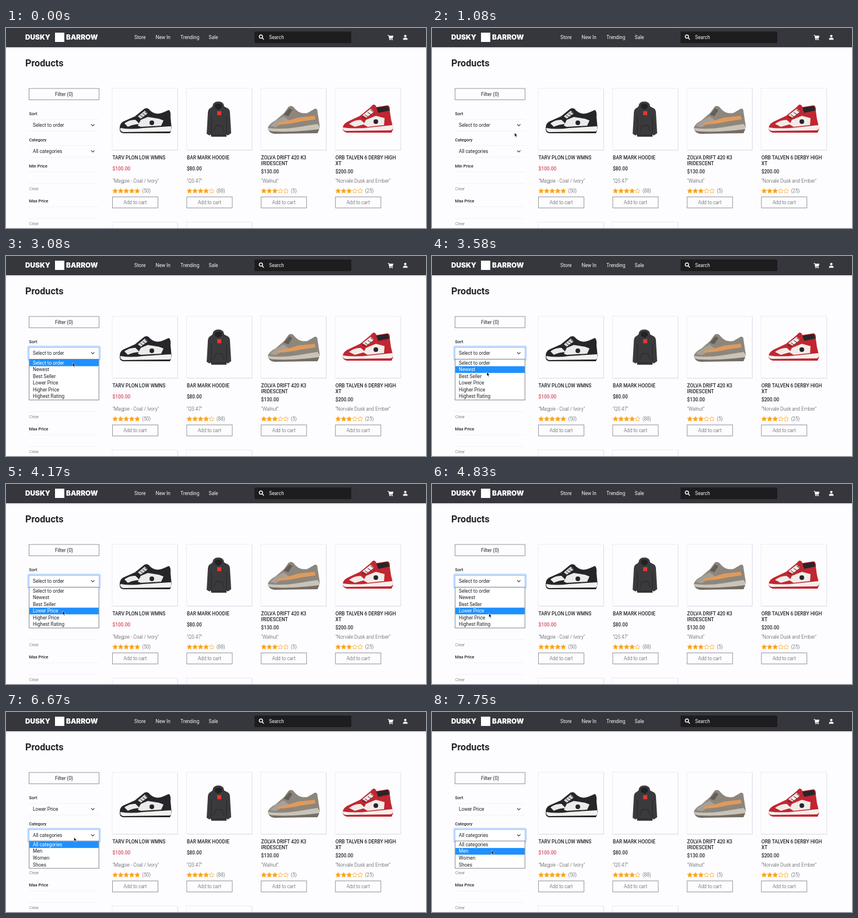
These frames come from a looping animation (720 px wide and 344 px high, 8 s). An HTML page:

```html
<!DOCTYPE html>
<html lang="en">
<head>
<meta charset="utf-8">
<title>Shop filters</title>
<style>
  html, body { margin: 0; width: 100%; height: 100%; overflow: hidden; background: #fdfdff; }
  svg { display: block; width: 720px; height: 344px; }
  text { font: 400 8.3px Roboto, sans-serif; fill: #212429; }
  .brand { font: 900 11.8px Inter, sans-serif; fill: #fff; }
  .nav { fill: #f6f6f8; }
  .h1 { font-size: 16.2px; font-weight: 600; }
  .label { font-size: 7.4px; font-weight: 500; }
  .clear { font-size: 7.3px; font-weight: 300; fill: #505258; }
  .bold { font-weight: 500; }
  .sale { fill: #d9485a; }
  .light { font-weight: 300; fill: #45474d; }
  .mid { text-anchor: middle; }
  .rule { stroke: #d4d4e6; stroke-width: .8; stroke-dasharray: 1 2; }
  .chev { fill: none; stroke: #34363c; stroke-width: 1.1; stroke-linecap: round; stroke-linejoin: round; }
  .btn { fill: none; stroke: #8c8d93; stroke-width: .9; }
  .star { fill: #fba31c; stroke: #fba31c; stroke-width: .7; stroke-linejoin: round; }
  .star.off { fill: none; }
  .list { fill: #fff; stroke: #77787f; stroke-width: .9; }
  .hit { fill: #1e90ff; }
</style>
</head>
<body>
<svg viewBox="0 0 720 344" xmlns="http://www.w3.org/2000/svg">
  <defs>
    <linearGradient id="drop" x2="0" y2="1">
      <stop stop-color="#9a9aa4" stop-opacity=".7"/>
      <stop offset="1" stop-color="#fff" stop-opacity="0"/>
    </linearGradient>

    <g id="low">
      <path fill="#25262a" d="M195 171Q195 163 203 160L221 152 237 139Q243 136 247 142 257 151 270 145L279 141Q283 143 282 153L284 174 281 181 201 181Q195 180 195 175Z"/>
      <path fill="#ebebe9" d="M203 164Q212 157 222 158L229 165Q216 166 209 170Z"/>
      <path fill="#ebebe9" d="M231 158L243 153 262 156 270 159 266 168 231 170 226 168Z"/>
      <path fill="#d6d6d6" d="M226 152L238 142 243 147 231 156Z"/>
      <path fill="#f1f1ee" d="M196 172Q214 175 235 172L283 169 284 175 281 178 201 179Q195 178 196 172Z"/>
      <circle cx="250" cy="163" r="4" fill="#25262a"/>
      <path fill="none" stroke="#25262a" d="M226 153l6 4M230 150l6 4M234 147l6 4M238 144l6 4"/>
    </g>

    <g id="hoodie">
      <path fill="#3a3a3d" d="M355 131Q358 126 364 126.500 370 126 373 131L374 135 380 138Q384 140 384 147L386 181 380 185 378 183 378 187 352 187 351 183 349 185 344 182 346 147Q346 140 350 138L354 135Z"/>
      <path fill="#232326" d="M358 132Q364 128 370 132L370 137 364 141 358 137Z"/>
      <path fill="none" stroke="#232326" stroke-width=".8" d="M352 151L352 183M378 151L378 183M356 178L360 168 370 168 374 178M352 184L378 184"/>
      <rect x="362" y="143" width="7" height="7" fill="#e2382f"/>
    </g>

    <g id="knit">
      <path fill="#8d867d" d="M449 171Q452 164 462 159L477 146 484 136Q488 132 493 136 502 149 517 146L529 139Q534 138 534 144L538 170Q536 180 520 180L460 181Q449 180 449 171Z"/>
      <path fill="#a7a097" d="M452 168Q462 159 476 152L486 160Q472 164 462 171Z"/>
      <path fill="#df9a5b" d="M466 163Q484 160 501 154L529 151 531 157 505 161Q484 166 466 166Z"/>
      <path fill="#655f59" d="M476 149L486 138 491 141 484 152Z"/>
      <path fill="#c9c3ba" d="M449 172Q472 175 497 171L534 165 538 170Q537 177 526 178L461 179Q450 178 449 172Z"/>
      <path fill="#756e66" d="M451 177Q480 181 537 174L534 181 460 182Q453 181 451 177Z"/>
    </g>

    <g id="high">
      <g id="boot">
        <path fill="#c22631" d="M577 172Q578 164 588 160L607 151 624 137 629 132Q633 131 635 136L654 133Q659 134 658 143L660 157 664 173 661 180 584 180Q577 178 577 172Z"/>
        <path fill="#f1ece8" d="M588 165Q597 158 608 158L616 165 598 170Z"/>
        <path fill="#f1ece8" d="M617 158L634 151 649 155 648 167 620 170 613 166Z"/>
        <path fill="#f1ece8" d="M611 150L625 139 631 144 618 154Z"/>
        <path fill="#27262a" d="M635 137L655 134 657 142 638 146Z"/>
        <path fill="#f4f0ee" d="M577 171Q598 174 624 171L663 167 664 173 660 176 584 177Q577 177 577 171Z"/>
        <circle cx="634" cy="161" r="4" fill="#27262a"/>
        <path fill="none" stroke="#27262a" d="M610 152l6 4M615 149l6 4M620 145l6 4M625 141l6 4"/>
      </g>
    </g>
  </defs>

  <rect width="720" height="344" fill="#fdfdff"/>
  <rect y="32" width="720" height="5" fill="url(#drop)"/>
  <rect width="720" height="33" fill="#36373c"/>
  <text class="brand" x="33" y="20">DUSKY</text>
  <rect x="84" y="8" width="16" height="16" fill="#fff"/>
  <text class="brand" x="103" y="20">BARROW</text>
  <text class="nav" x="220" y="19">Store</text>
  <text class="nav" x="256.5" y="19">New In</text>
  <text class="nav" x="299" y="19">Trending</text>
  <text class="nav" x="347.5" y="19">Sale</text>
  <rect x="426" y="6" width="166" height="20" rx="1.5" fill="#1d1d20"/>
  <g fill="none" stroke="#fff" stroke-width="1.4" stroke-linecap="round">
    <circle cx="437" cy="14.8" r="2.8"/><path d="M439.2 17l2.4 2.4"/>
  </g>
  <text class="nav" x="451" y="19">Search</text>
  <g fill="#fff">
    <path d="M654.5 12h2l.4 1.2h7.2l-1.1 4.5h-5.2l.2.9h4.7v.9h-5.6l-1.4-6.4h-1.2z"/>
    <circle cx="658.3" cy="20" r="1"/><circle cx="662" cy="20" r="1"/>
    <circle cx="684.5" cy="13.800" r="2.1"/>
    <path d="M680.7 20.2v-1q0-2.5 2.6-2.5h2.4q2.6 0 2.6 2.5v1z"/>
  </g>

  <text class="h1" x="33" y="65.5">Products</text>
  <rect class="btn" x="39.5" y="104" width="120" height="19.5"/>
  <text class="mid" x="99.5" y="117">Filter (0)</text>
  <g id="side"></g>
  <g id="grid"></g>
  <g id="menus"></g>
  <path id="cursor" d="M0 0V7L1.6 5.6 2.8 8.2 4 7.6 2.9 5.1H5Z" fill="#111" stroke="#fff" stroke-width=".6"/>
</svg>

<script>
const $ = id => document.getElementById(id);
const text = (x, y, s, cls = '') => `<text class="${cls}" x="${x}" y="${y}">${s}</text>`;
const ROW = 11.55;

// Sidebar
const field = y => `<path class="rule" d="M39.5 ${y}h120M39.5 ${y + 20}h120"/>`;
const ring = (id, y) => `<g id="${id}Ring">
  <rect x="38" y="${y - 1.5}" width="123" height="23" rx="1.5" fill="#fff" stroke="#c3dbfd" stroke-width="3"/>
  <rect x="39.5" y="${y}" width="120" height="20" fill="none" stroke="#93bdf8" stroke-width=".8"/></g>`;
const select = (id, y, value) => field(y) + ring(id, y) +
  `<text id="${id}Value" x="46" y="${y + 12.8}">${value}</text>
  <path class="chev" d="M146.3 ${y + 8.6}l2.5 2.5 2.5-2.5"/>`;

$('side').innerHTML =
  text(39.5, 150, 'Sort', 'label') + select('sort', 157.3, 'Select to order') +
  text(39.5, 195, 'Category', 'label') + select('cat', 202.3, 'All categories') +
  text(39.5, 240, 'Min Price', 'label') + field(247.5) + text(39.8, 278.5, 'Clear', 'clear') +
  text(39.5, 300, 'Max Price', 'label') + field(307.5) + text(39.8, 338.5, 'Clear', 'clear');

// Product cards
const starPoints = (cx, cy) => Array.from({ length: 10 }, (_, i) => {
  const r = i % 2 ? 2.1 : 4.4, a = i * Math.PI / 5;
  return (cx + r * Math.sin(a)).toFixed(2) + ',' + (cy - r * Math.cos(a)).toFixed(2);
}).join(' ');

const card = (x, y) => `<rect x="${x + 1}" y="${y + 1}" width="112" height="106" fill="#dfdfee"/>
  <rect x="${x}" y="${y}" width="112" height="106" fill="#fdfdff" stroke="#e6e6f2" stroke-width=".8"/>`;

const products = [
  { art: 'low', title: ['TARV PLON LOW WMNS'], price: '$100.00', sale: true, note: 'Magpie - Coal / Ivory', stars: 5, votes: 50 },
  { art: 'hoodie', title: ['BAR MARK HOODIE'], price: '$80.00', note: 'QS 47', stars: 4, votes: 88 },
  { art: 'knit', title: ['ZOLVA DRIFT 420 K3', 'IRIDESCENT'], price: '$130.00', note: 'Walnut', stars: 3, votes: 5 },
  { art: 'high', title: ['ORB TALVEN 6 DERBY HIGH', 'XT'], price: '$200.00', note: 'Norvale Dusk and Ember', stars: 3, votes: 25 }
];

$('grid').innerHTML = products.map((p, i) => {
  const x = 182.5 + i * 127.4;
  const stars = Array.from({ length: 5 }, (_, k) =>
    `<polygon class="star ${k < p.stars ? '' : 'off'}" points="${starPoints(x + 4.6 + k * 9.5, 280.4)}"/>`);
  return card(x - .5, 103.8) + `<use href="#${p.art}"/>` +
    p.title.map((s, k) => text(x, 225.8 + k * 9.8, s, 'bold')).join('') +
    text(x, p.title.length > 1 ? 250 : 244.8, p.price, p.sale ? 'bold sale' : 'bold') +
    text(x, 266, `"${p.note}"`, 'light') + stars.join('') +
    text(x + 51, 283, `(${p.votes})`, 'light') +
    `<rect class="btn" x="${x}" y="290.5" width="78" height="19"/>` +
    text(x + 39, 303, 'Add to cart', 'light mid');
}).join('') + card(182, 333.5) + card(309.4, 333.5);

// Drop-down lists
const menu = (id, top, items) => {
  const g = document.createElementNS('http://www.w3.org/2000/svg', 'g');
  g.innerHTML = `<rect class="list" x="39.7" y="${top - .4}" width="119.6" height="${items.length * ROW + .8}"/>
    <rect class="hit" x="40.2" width="118.6" height="${ROW}"/>` +
    items.map((s, i) => text(46, top + 8.6 + i * ROW, s)).join('');
  $('menus').append(g);
  const hit = g.querySelector('.hit'), rows = g.querySelectorAll('text');
  return (open, y) => {
    const n = Math.max(0, Math.min(items.length - 1, Math.floor((y - top) / ROW)));
    g.style.display = open ? '' : 'none';
    hit.setAttribute('y', top + n * ROW);
    rows.forEach((r, i) => { r.style.fill = i === n ? '#fff' : ''; });
  };
};
const sortMenu = menu('sort', 178,
  ['Select to order', 'Newest', 'Best Seller', 'Lower Price', 'Higher Price', 'Highest Rating']);
const catMenu = menu('cat', 222.3, ['All categories', 'Men', 'Women', 'Shoes']);

// Pointer stops: time, x, y
const path = [
  [80, 656, 318], [500, 243, 83], [830, 243, 83], [1080, 141.5, 180], [1250, 136, 173],
  [1500, 141, 164.5], [2670, 141, 164.5], [3420, 94, 197.5], [3580, 94, 199.5],
  [4250, 97, 219], [4560, 98, 228], [4830, 97.5, 222.5], [5080, 97.5, 221],
  [6170, 97.5, 221], [6420, 116.5, 215.5], [7170, 116.5, 215.5], [7750, 102, 238], [8000, 102, 238]
];
const ease = u => u * u * (3 - 2 * u);
function pointer(t) {
  const i = Math.max(1, path.findIndex(p => p[0] > t));
  const [t0, x0, y0] = path[i - 1], [t1, x1, y1] = path[i];
  const u = ease(Math.max(0, (t - t0) / (t1 - t0)));
  return [x0 + (x1 - x0) * u, y0 + (y1 - y0) * u];
}

function draw(now) {
  const t = now % 8000, [x, y] = pointer(t), catOpen = t >= 6665;
  $('cursor').setAttribute('transform', `translate(${x.toFixed(2)} ${y.toFixed(2)})`);
  $('cursor').style.display = t < 80 ? 'none' : '';
  sortMenu(t >= 1665 && t < 5665, y);
  catMenu(catOpen, y);
  $('sortRing').style.opacity = catOpen ? 0 : Math.max(0, Math.min(1, (t - 1665) / 150));
  $('catRing').style.opacity = catOpen ? 1 : 0;
  $('sortValue').textContent = t < 5665 ? 'Select to order' : 'Lower Price';
}

let start;
function tick(now) {
  start ??= now;
  draw(now - start);
  requestAnimationFrame(tick);
}
draw(0);
requestAnimationFrame(tick);
</script>
</body>
</html>
```
